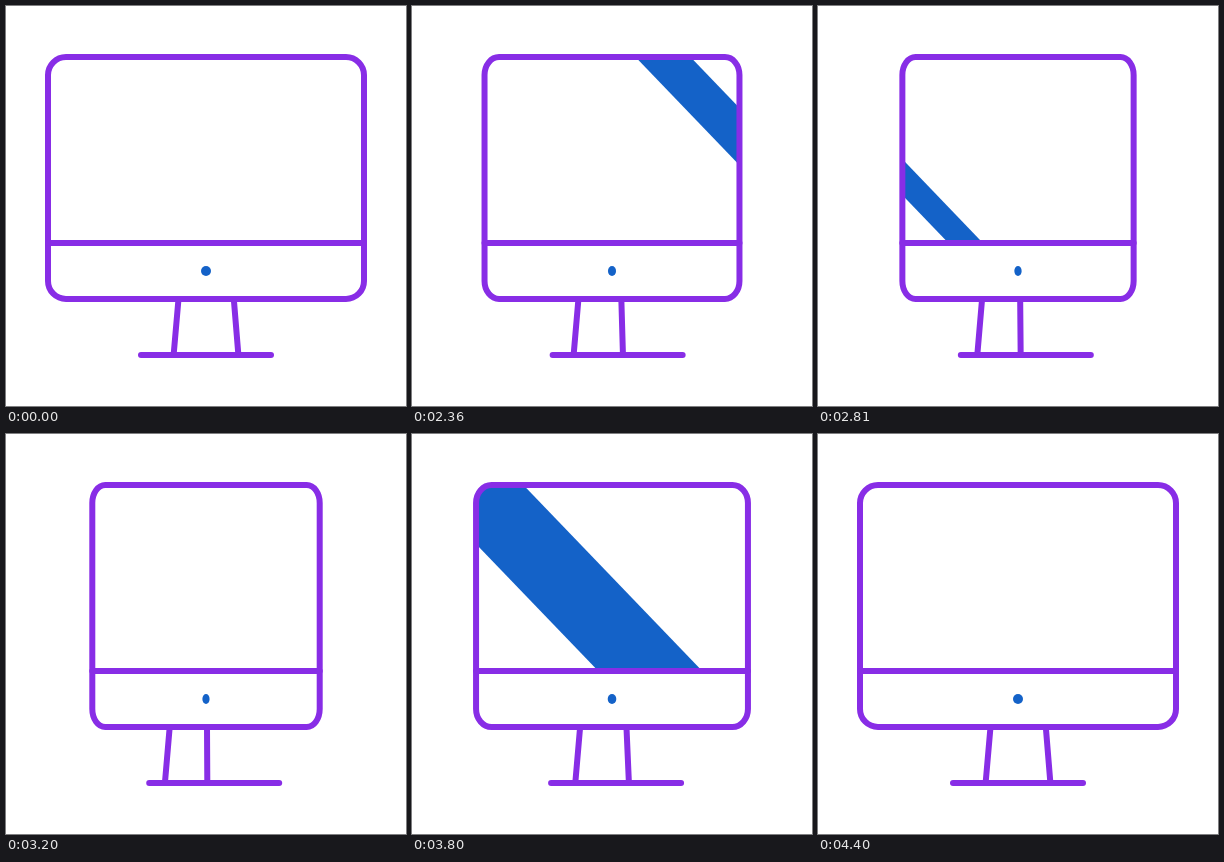
An HTML page with a canvas that plays this animation: 400x400 px, repeating every 4.43 s.

```html
<!DOCTYPE html>
<html lang="en">
<head>
<meta charset="utf-8">
<title>Turning monitor</title>
<style>
  html, body { margin: 0; width: 100%; height: 100%; overflow: hidden; background: #fff; }
  canvas { display: block; width: 400px; height: 400px; }
</style>
</head>
<body>
<canvas id="stage" width="400" height="400"></canvas>
<script>
const ctx = document.getElementById('stage').getContext('2d');
const PURPLE = '#882de6', BLUE = '#1462c8';
const LOOP = 4430, START = 2000, TURN = 1200;
const TOP = 51, DIVIDER = 237, BOTTOM = 293, FLOOR = 349;
const SLOPE = 1.04;

const clamp = v => Math.min(1, Math.max(0, v));
const smooth = u => u * u * (3 - 2 * u);
const glide = u => (u + smooth(u)) / 2;

// Cubic bezier easing with control points (x1, 0) and (x2, 1).
function ease(u, x1, x2) {
  let lo = 0, hi = 1;
  for (let i = 0; i < 24; i++) {
    const m = (lo + hi) / 2, n = 1 - m;
    if (3 * n * n * m * x1 + 3 * n * m * m * x2 + m ** 3 < u) lo = m;
    else hi = m;
  }
  return smooth(lo);
}

function line(x1, y1, x2, y2) {
  ctx.beginPath();
  ctx.moveTo(x1, y1);
  ctx.lineTo(x2, y2);
  ctx.stroke();
}

// Slanted reflection; left is its x at the top inner edge of the screen.
function stripe(left, width) {
  const at = y => left + (y - 54) / SLOPE;
  ctx.beginPath();
  ctx.moveTo(at(TOP), TOP);
  ctx.lineTo(at(TOP) + width, TOP);
  ctx.lineTo(at(DIVIDER) + width, DIVIDER);
  ctx.lineTo(at(DIVIDER), DIVIDER);
  ctx.fill();
}

function draw(t) {
  const away = clamp((t - START) / TURN);
  const back = clamp((t - START - TURN) / TURN);
  const turn = back ? 1 - ease(back, 0.6, 0.4) : ease(away, 0.2, 0);
  const half = 158 - 44.3 * turn;
  const scale = half / 158;

  ctx.clearRect(0, 0, 400, 400);
  ctx.strokeStyle = PURPLE;
  ctx.fillStyle = BLUE;
  ctx.lineWidth = 6;
  ctx.lineCap = 'round';

  line(172.5 - 8.8 * turn, BOTTOM, 167.7 - 8.7 * turn, FLOOR - 1);
  line(227.8 - 26.8 * turn, BOTTOM, 232.3 - 31 * turn, FLOOR - 1);
  line(135 + 8.2 * turn, FLOOR, 265 + 8.2 * turn, FLOOR);

  const frame = new Path2D();
  frame.roundRect(200 - half, TOP, 2 * half, BOTTOM - TOP, [{ x: 18 * scale, y: 18 }]);
  ctx.save();
  ctx.clip(frame);
  if (back) {
    stripe(-356 + 731 * glide(back), 104);
  } else {
    const x = 462 - 910 * glide(away);
    stripe(x, 55);
    stripe(x + 142.5, 34.5);
  }
  ctx.restore();

  ctx.stroke(frame);
  line(200 - half, DIVIDER, 200 + half, DIVIDER);
  ctx.beginPath();
  ctx.ellipse(200, 265, 5 * scale, 5, 0, 0, 2 * Math.PI);
  ctx.fill();
}

const begin = performance.now();
function tick() {
  draw((performance.now() - begin) % LOOP);
  requestAnimationFrame(tick);
}
tick();
</script>
</body>
</html>
```
